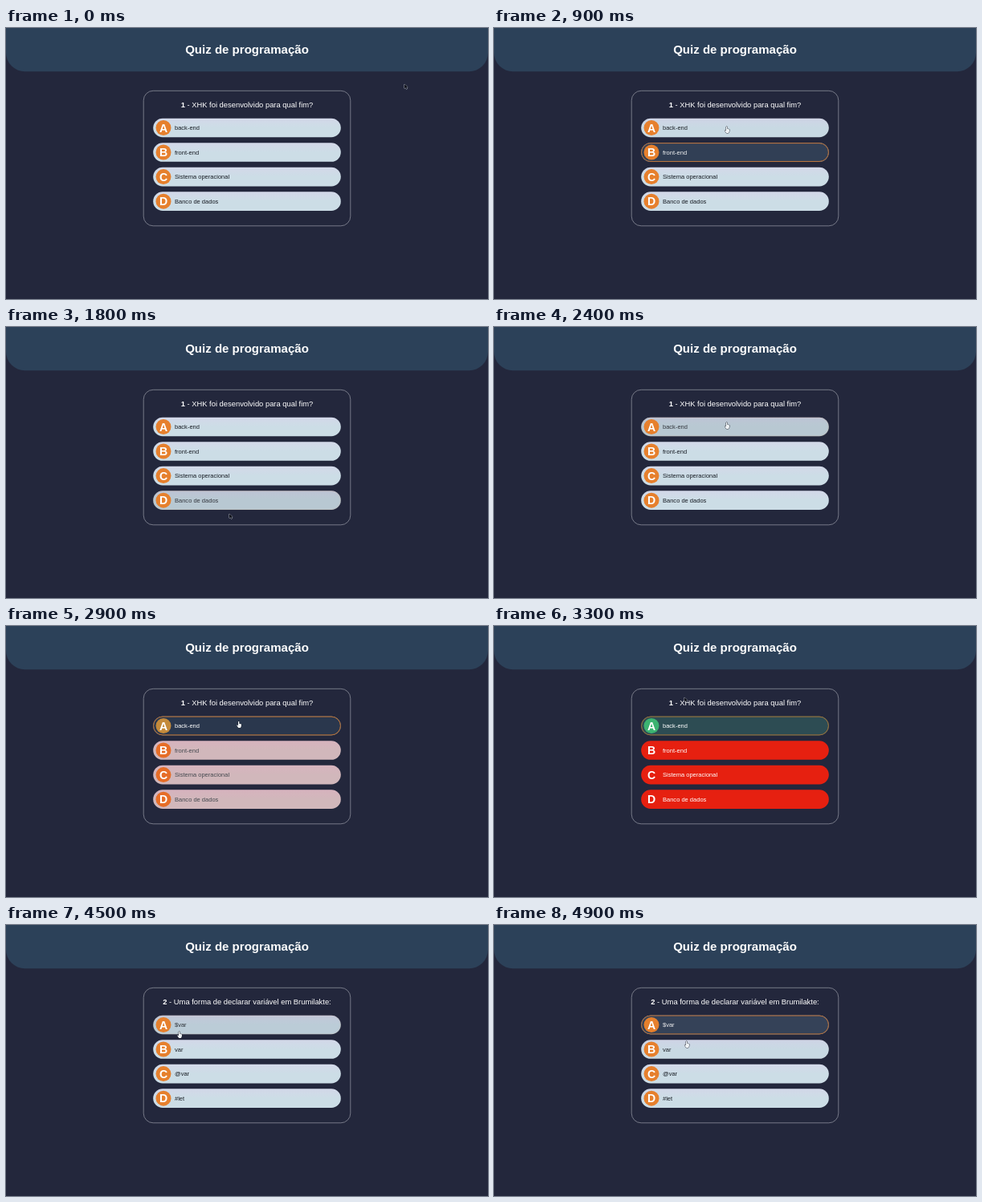
Animation, 600 px wide and 338 px high, one loop 5000 ms. Source, as an HTML page with a canvas:

```html
<!DOCTYPE html>
<html lang="pt-BR">
<head>
<meta charset="utf-8">
<title>Quiz de programação</title>
<style>
  html, body { margin: 0; width: 100%; height: 100%; overflow: hidden; background: #23273c; }
  canvas { display: block; width: 600px; height: 338px; }
</style>
</head>
<body>
<canvas id="stage"></canvas>
<script>
const W = 600, H = 338, LOOP = 5000, FADE = 400, STEP = 10;
const FONT = '"Liberation Sans", Arial, sans-serif';
const ANSWER_AT = 2850, NEXT_AT = 3500;

const ORANGE = [230, 128, 45], RED = [230, 32, 16], GREEN = [60, 179, 113];
const PILL = [204, 221, 230], LAVENDER = [211, 216, 233], DARK = [42, 55, 77];
const INK = [24, 28, 36], WHITE = [255, 255, 255];

const questions = [
  { text: 'XHK foi desenvolvido para qual fim?',
    options: ['back-end', 'front-end', 'Sistema operacional', 'Banco de dados'] },
  { text: 'Uma forma de declarar variável em Brumilakte:',
    options: ['$var', 'var', '@var', '#let'] }
];

// The pointer rests between these moves.
const home = { x: 496, y: 70 };
const moves = [
  { from: 0, to: 450, x: 292, y: 152 },
  { from: 860, to: 900, x: 289, y: 123 },
  { from: 900, to: 1400, x: 276, y: 143 },
  { from: 1400, to: 1800, x: 278, y: 233 },
  { from: 2300, to: 2360, x: 289, y: 119 },
  { from: 3200, to: 3300, x: 237, y: 89 },
  { from: 4400, to: 4500, x: 215, y: 133 },
  { from: 4840, to: 4900, x: 239, y: 145 }
];

const canvas = document.getElementById('stage');
const ctx = canvas.getContext('2d');
const ratio = window.devicePixelRatio || 1;
canvas.width = W * ratio;
canvas.height = H * ratio;
ctx.scale(ratio, ratio);

const clamp = v => Math.max(0, Math.min(1, v));
const ramp = (t, from, span) => clamp((t - from) / span);
const ease = k => k * k * (3 - 2 * k);
const lerp = (a, b, k) => a + (b - a) * k;
const mix = (a, b, k) => a.map((v, i) => lerp(v, b[i], k));
const rgb = (c, a = 1) => `rgba(${c.map(Math.round).join(',')},${a})`;

const optionBox = i => ({ x: 183.2, y: 112.7 + i * 30.55, w: 233.6, h: 23.6 });

function pointerAt(t) {
  return moves.reduce((p, m) => {
    const k = ease(ramp(t, m.from, m.to - m.from));
    return { x: lerp(p.x, m.x, k), y: lerp(p.y, m.y, k) };
  }, home);
}

function isOver(index, p) {
  const b = optionBox(index);
  return p.x > b.x && p.x < b.x + b.w && p.y > b.y && p.y < b.y + b.h;
}

// An option darkens while the pointer is over it and recovers afterwards.
function hoverLevels(t) {
  const levels = [0, 0, 0, 0];
  for (let time = 0; time < t; time += STEP) {
    const p = pointerAt(time);
    levels.forEach((level, i) => {
      levels[i] = clamp(level + (isOver(i, p) ? STEP : -STEP) / FADE);
    });
  }
  return levels;
}

function roundBox(x, y, w, h, radii) {
  ctx.beginPath();
  ctx.roundRect(x, y, w, h, radii);
}

function setFont(size, bold) {
  ctx.font = `${bold ? 'bold ' : ''}${size}px ${FONT}`;
}

function write(text, x, y, size, color, { bold = false, align = 'left' } = {}) {
  setFont(size, bold);
  ctx.textAlign = align;
  ctx.fillStyle = color;
  ctx.fillText(text, x, y);
}

function drawQuestion(number, text) {
  const size = 9.4, rest = ` - ${text}`;
  setFont(size, true);
  const lead = ctx.measureText(number).width;
  setFont(size, false);
  const x = 300 - (lead + ctx.measureText(rest).width) / 2;
  write(number, x, 99, size, '#fff', { bold: true });
  write(rest, x + lead, 99, size, '#fff');
}

function drawOption(index, label, hover, answered) {
  const { x, y, w, h } = optionBox(index);
  const middle = y + h / 2;
  const verdict = index === 0 ? GREEN : RED;

  const shade = ctx.createLinearGradient(0, y, 0, y + h / 2);
  shade.addColorStop(0, rgb(mix(LAVENDER, verdict, answered)));
  shade.addColorStop(1, rgb(mix(PILL, verdict, answered)));
  roundBox(x, y, w, h, h / 2);
  ctx.fillStyle = shade;
  ctx.fill();
  ctx.fillStyle = rgb(DARK, hover);
  ctx.fill();

  roundBox(x + 0.4, y + 0.4, w - 0.8, h - 0.8, h / 2 - 0.4);
  ctx.strokeStyle = rgb(ORANGE, hover);
  ctx.lineWidth = 0.8;
  ctx.stroke();

  ctx.beginPath();
  ctx.arc(196, middle, 9.5, 0, Math.PI * 2);
  ctx.fillStyle = rgb(mix(ORANGE, verdict, answered));
  ctx.fill();
  write('ABCD'[index], 196, middle + 5, 14.1, '#fff', { bold: true, align: 'center' });
  write(label, 210, middle + 2.5, 7.52, rgb(mix(INK, WHITE, Math.max(hover, answered))));
}

function drawPointer(t) {
  const p = pointerAt(t);
  const hand = [0, 1, 2, 3].some(i => isOver(i, p));
  const shape = hand
    ? 'M0 0h1.3v2.8l2.8 .7-.3 2.8-.9 1.7H.2l-2-3.1.7-.6L0 5.2z'
    : 'M0 0v5.4l1.4-1.2 1 2.1 1-.5-.9-1.9 1.6-.1z';
  const outline = new Path2D(shape);
  ctx.save();
  ctx.translate(p.x, p.y);
  ctx.lineWidth = 0.8;
  ctx.lineJoin = 'round';
  ctx.strokeStyle = hand ? '#171a24' : '#c5c9d2';
  ctx.fillStyle = hand ? '#eef2f5' : '#10131c';
  ctx.stroke(outline);
  ctx.fill(outline);
  ctx.restore();
}

function draw(t) {
  ctx.fillStyle = '#23273c';
  ctx.fillRect(0, 0, W, H);
  roundBox(0, -1, W, 55.2, [0, 0, 23.5, 23.5]);
  ctx.fillStyle = '#2c4159';
  ctx.fill();
  write('Quiz de programação', 300, 32, 15.04, '#fff', { bold: true, align: 'center' });

  roundBox(171.2, 78.3, 257.6, 168.5, 12);
  ctx.strokeStyle = '#9a9da8';
  ctx.lineWidth = 0.7;
  ctx.stroke();

  const current = t < NEXT_AT ? 0 : 1;
  const answered = ramp(t, ANSWER_AT, 250) * (1 - ramp(t, NEXT_AT, 250));
  const levels = hoverLevels(t);
  drawQuestion(String(current + 1), questions[current].text);
  questions[current].options.forEach((label, i) => drawOption(i, label, levels[i], answered));
  drawPointer(t);
}

const start = performance.now();
function tick() {
  // The picture advances in steps of a tenth of a second.
  const t = (performance.now() - start) % LOOP;
  draw(Math.floor(t / 100) * 100);
  requestAnimationFrame(tick);
}
tick();
</script>
</body>
</html>
```
